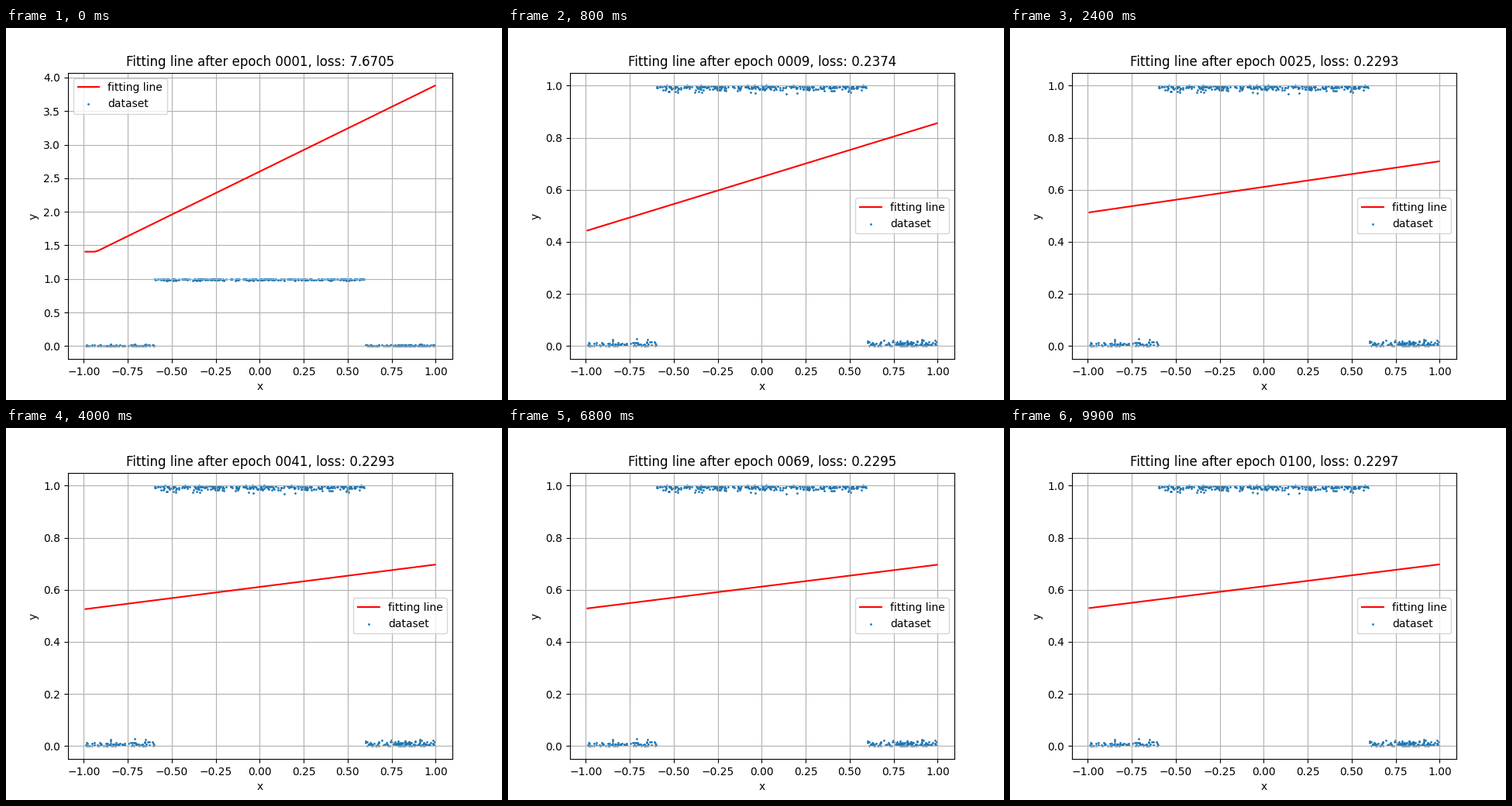
Recreate the animation shown at these times as a matplotlib script. Size 640 px wide and 480 px high, loop 10000 ms.

```python
import numpy as np
import matplotlib.pyplot as plt
from matplotlib.animation import FuncAnimation

EPOCHS = 100
X_MIN, X_MAX = -0.990, 0.996
EDGE = 0.597


def make_dataset(n=500, seed=4):
    """Box function whose noise always points into the unit range."""
    rng = np.random.default_rng(seed)
    x = np.sort(rng.uniform(X_MIN, X_MAX, n))
    x[0], x[-1] = X_MIN, X_MAX
    noise = np.abs(rng.normal(0, 0.01, n)).clip(max=0.031)
    return x, np.where(np.abs(x) < EDGE, 1 - noise, noise)


def decay(epoch, start, knee, rate):
    """Fall geometrically from start to knee at epoch 9, then at the given rate."""
    if epoch <= 9:
        return start * (knee / start) ** ((epoch - 1) / 8)
    return knee * rate ** (epoch - 9)


def fit(x, epoch):
    slope = 0.0843 + decay(epoch, 1.2, 0.123, 0.874)
    bias = 0.611 + 4e-5 * max(epoch - 40, 0) + decay(epoch, 1.989, 0.038, 0.61)
    kink = -0.93 - 0.1 * (epoch - 1)
    return bias + slope * np.maximum(x, kink)


def loss(epoch):
    floor = 0.2292 + 7e-6 * max(epoch - 27, 0)
    return floor + decay(epoch, 7.4413, 0.0082, 0.764)


xs, ys = make_dataset()
fig, ax = plt.subplots(figsize=(6.4, 4.8), dpi=100)


def draw(i):
    epoch = i + 1
    ax.clear()
    line, = ax.plot(xs, fit(xs, epoch), color="red", label="fitting line")
    dots = ax.scatter(xs, ys, s=1, label="dataset")
    ax.legend(handles=[line, dots], loc="best")
    ax.grid(True)
    ax.set_xlabel("x")
    ax.set_ylabel("y")
    ax.set_title(f"Fitting line after epoch {epoch:04d}, loss: {loss(epoch):.4f}",
                 x=0.5005)
    return []


anim = FuncAnimation(fig, draw, frames=EPOCHS, init_func=lambda: [],
                     interval=100, repeat=True, repeat_delay=0)
plt.show()
```
